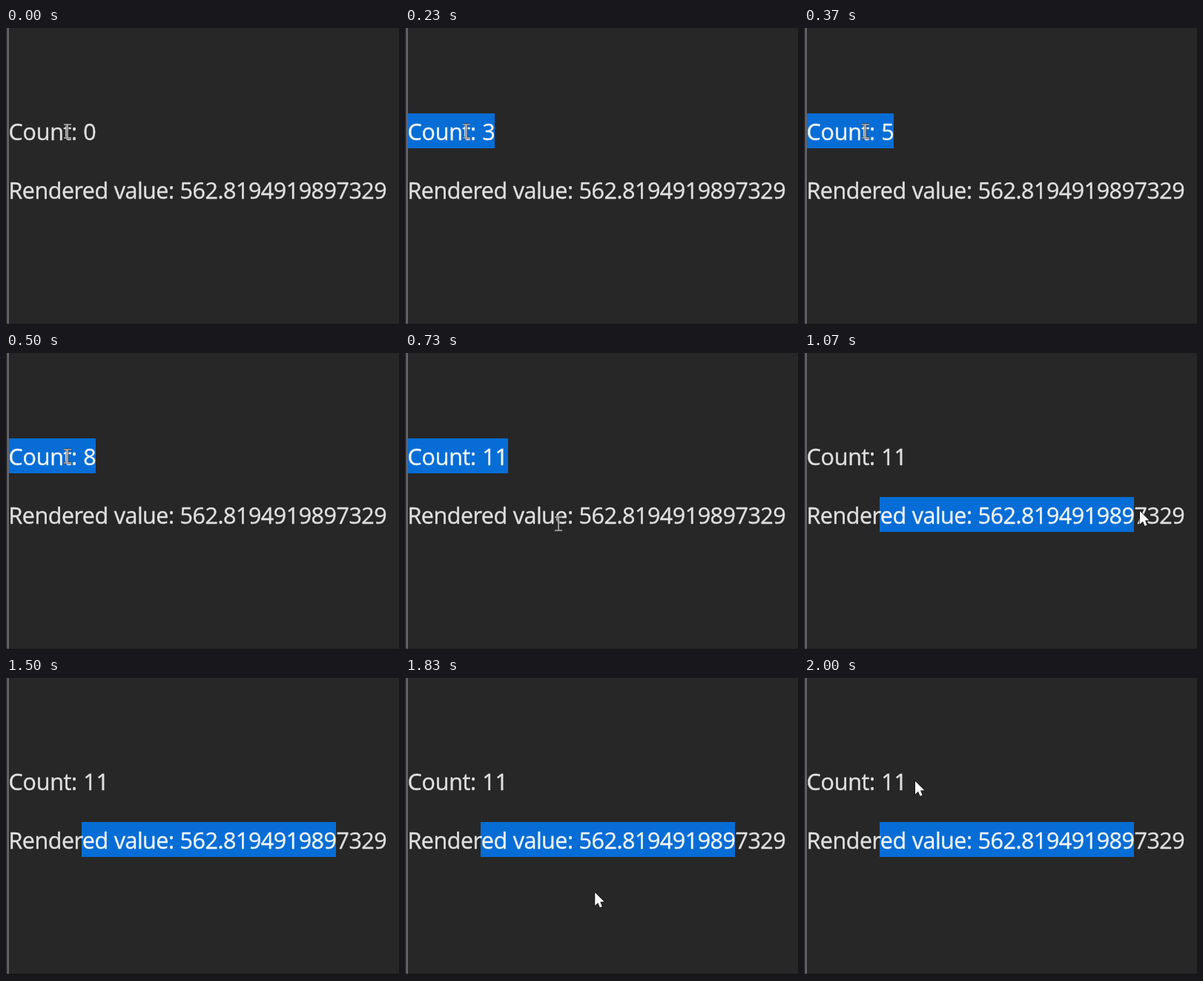
Write an HTML page with a canvas that moves like this. It is 530 px wide and 400 px high and loops after 2030 ms.

```html
<!DOCTYPE html>
<html lang="en">
<head>
<meta charset="utf-8">
<title>Count demo</title>
<style>
html, body { margin: 0; width: 100%; height: 100%; overflow: hidden; background: #272727; }
canvas { display: block; width: 530px; height: 400px; }
</style>
</head>
<body>
<canvas id="stage" width="530" height="400"></canvas>
<script>
const ctx = document.getElementById('stage').getContext('2d');
const LOOP = 2030, STEP = 100 / 3, LEFT = 3.5;
const VALUE = 'Rendered value: 562.8194919897329';
const PRESS = 24, RELEASE = 32, DRAG_FROM = 6, DRAG_TO = 29;

const linear = k => k;
const easeIn = k => k * k;
const easeOut = k => 1 - (1 - k) * (1 - k);
const mix = (a, b, k) => a + (b - a) * k;
const progress = (n, from, to) => Math.max(0, Math.min(1, (n - from) / (to - from)));

const rest = { x: 83, y: 139 }, low = { x: 207, y: 230 }, press = { x: 103, y: 196 };
const drop = { x: 453, y: 213 }, exit = { x: 340, y: 405 };
const entry = { x: 303, y: 355 }, home = { x: 150, y: 139 };

const moves = [
  { from: 0, to: 18, a: rest, b: rest, ease: linear, shape: drawBeam },
  { from: 18, to: 22, a: rest, b: low, ease: linear, shape: drawBeam },
  { from: 22, to: PRESS, a: low, b: press, ease: linear, shape: drawBeam },
  { from: PRESS, to: RELEASE, a: press, b: drop, ease: linear, shape: drawArrow },
  { from: RELEASE, to: 45, a: drop, b: exit, ease: k => easeIn(progress(k, 0.46, 1)), shape: drawArrow },
  { from: 55, to: 61, a: entry, b: home, ease: k => easeOut(mix(1 / 6, 7 / 6, k)), shape: drawArrow }
];

function setSpacing(px) {
  ctx.font = '30.5px "Open Sans", "Noto Sans", sans-serif';
  ctx.letterSpacing = px + 'px';
  ctx.wordSpacing = '0.6px';
}

function edge(text, i) {
  return LEFT + ctx.measureText(text.slice(0, i)).width;
}

function nearestChar(text, x) {
  let i = 0;
  while (i < text.length && (edge(text, i) + edge(text, i + 1)) / 2 < x) i++;
  return i;
}

function inkText(text, base, color) {
  ctx.fillStyle = ctx.strokeStyle = color;
  ctx.lineWidth = 0.4;
  ctx.fillText(text, LEFT, base);
  ctx.strokeText(text, LEFT, base);
}

function drawLine(text, base, from, to) {
  inkText(text, base, '#e0e0e0');
  if (to <= from) return;
  const x0 = Math.max(4, Math.round(edge(text, from) - 1.2));
  const x1 = Math.round(edge(text, to));
  ctx.save();
  ctx.beginPath();
  ctx.rect(x0, base - 36, x1 - x0, 47);
  ctx.clip();
  ctx.fillStyle = '#076dd6';
  ctx.fillRect(x0, base - 36, x1 - x0, 47);
  inkText(text, base, '#f0f5fb');
  ctx.restore();
}

function drawBeam() {
  ctx.beginPath();
  ctx.moveTo(0, -9);
  ctx.lineTo(0, 9);
  for (const y of [-9, 9]) {
    ctx.moveTo(-5, y);
    ctx.lineTo(5, y);
  }
  ctx.lineWidth = 4;
  ctx.strokeStyle = 'rgba(45, 45, 45, 0.5)';
  ctx.stroke();
  ctx.lineWidth = 1.6;
  ctx.strokeStyle = '#b0b0b0';
  ctx.stroke();
}

function drawArrow() {
  const outline = new Path2D('M0 0V17.5L4 13.7L6.6 20L9.6 18.7L7 12.6L12.3 12.3Z');
  ctx.lineWidth = 1.4;
  ctx.strokeStyle = '#151515';
  ctx.stroke(outline);
  ctx.fillStyle = '#fafafa';
  ctx.fill(outline);
}

function drawPointer(n) {
  const move = moves.find(m => n >= m.from && n < m.to);
  if (!move) return;
  const { from, to, a, b, ease, shape } = move;
  const k = ease(progress(n, from, to));
  ctx.save();
  ctx.translate(mix(a.x, b.x, k), mix(a.y, b.y, k));
  shape();
  ctx.restore();
}

function draw(n) {
  ctx.fillStyle = '#272727';
  ctx.fillRect(0, 0, 530, 400);
  ctx.fillStyle = '#6d6d77';
  ctx.fillRect(1.5, 0, 2.3, 400);
  ctx.fillStyle = '#141414';
  ctx.fillRect(0, 398.5, 530, 1.5);

  const count = Math.max(0, Math.min(11, Math.floor((n * STEP - 60) / 52)));
  const label = 'Count: ' + count;
  // A double click picks the word, a triple click the whole line
  const picked = n >= PRESS || count < 2 ? 0 : count < 3 ? 5 : label.length;
  setSpacing(-0.25);
  drawLine(label, 151, 0, picked);

  // The selection trails the pointer and catches up at the end
  setSpacing(-0.5);
  const reach = mix(press.x, drop.x, progress(n, PRESS, RELEASE) ** 1.5);
  drawLine(VALUE, 230, DRAG_FROM, Math.min(DRAG_TO, nearestChar(VALUE, reach)));

  drawPointer(n);
}

const start = performance.now();
function tick() {
  const t = (performance.now() - start) % LOOP;
  draw(Math.min(60, Math.floor((t + 3.4) / STEP)));
  requestAnimationFrame(tick);
}
tick();
</script>
</body>
</html>
```
